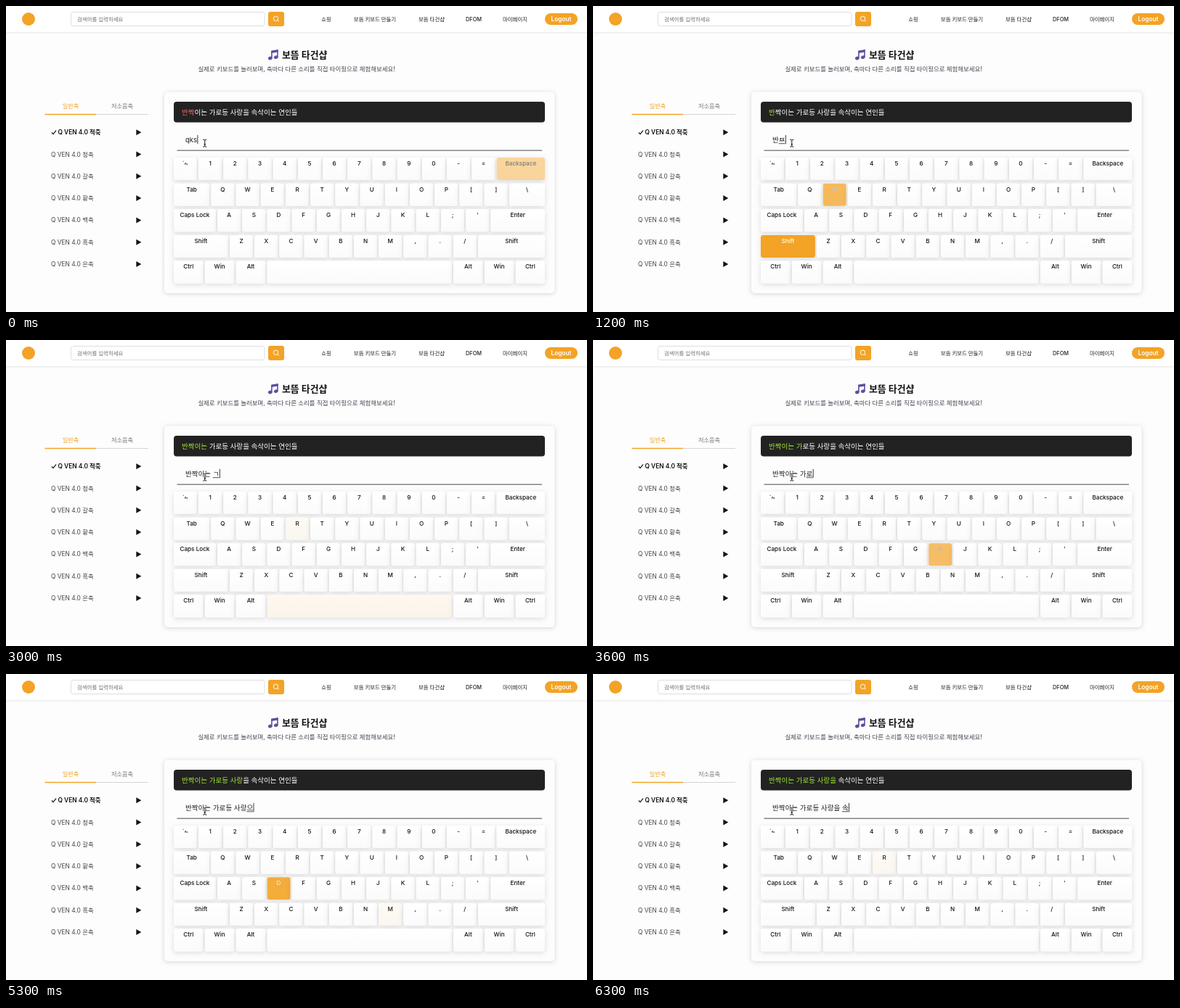
These frames come from a looping animation (800x422 px, 6.4 s). An HTML page with a canvas:

```html
<!DOCTYPE html>
<html lang="ko">
<head>
<meta charset="utf-8">
<title>키보드 타건샵</title>
<style>
  html, body { margin: 0; width: 100%; height: 100%; overflow: hidden; background: #fdfdfd; }
  canvas { display: block; width: 800px; height: 422px; }
</style>
</head>
<body>
<canvas id="stage"></canvas>
<script>
const W = 800, H = 422, LOOP = 6400, STEP = 100;
const ORANGE = '#f3a325';
const FONT = 'Inter, "Noto Sans CJK KR", "Noto Sans CJK JP", "Noto Sans CJK", sans-serif';
const SENTENCE = '반짝이는 가로등 사랑을 속삭이는 연인들';
const canvas = document.getElementById('stage');
const ctx = canvas.getContext('2d');
const dpr = window.devicePixelRatio || 1;
canvas.width = W * dpr;
canvas.height = H * dpr;
ctx.scale(dpr, dpr);

// Key presses: time, key, text afterwards, optional hold time
const presses = [
  [-45, 'Backspace', 'qks'], [130, 'Backspace', 'qk'], [290, 'Backspace', 'q'], [450, 'Backspace', ''],
  [600, 'Q', 'ㅂ'], [740, 'K', '바'], [880, 'S', '반'],
  [1000, 'Shift', '반', 250], [1125, 'W', '반ㅉ'], [1400, 'K', '반짜'], [1750, 'R', '반짝'],
  [2220, 'D', '반짝ㅇ'], [2335, 'L', '반짝이'],
  [2450, 'S', '반짝인'], [2560, 'M', '반짝이느'], [2680, 'S', '반짝이는'], [2788, ' ', '반짝이는 '],
  [2995, 'R', '반짝이는 ㄱ'], [3130, 'K', '반짝이는 가'],
  [3300, 'F', '반짝이는 갈'], [3450, 'H', '반짝이는 가로'],
  [3620, 'E', '반짝이는 가롣'], [3770, 'M', '반짝이는 가로드'], [3930, 'D', '반짝이는 가로등'],
  [4080, ' ', '반짝이는 가로등 '],
  [4250, 'T', '반짝이는 가로등 ㅅ'], [4420, 'K', '반짝이는 가로등 사'],
  [4600, 'F', '반짝이는 가로등 살'], [4770, 'K', '반짝이는 가로등 사라'], [4940, 'D', '반짝이는 가로등 사랑'],
  [5170, 'D', '반짝이는 가로등 사랑ㅇ'], [5295, 'M', '반짝이는 가로등 사랑으'],
  [5450, 'F', '반짝이는 가로등 사랑을'], [5690, ' ', '반짝이는 가로등 사랑을 '],
  [5900, 'T', '반짝이는 가로등 사랑을 ㅅ'], [6070, 'H', '반짝이는 가로등 사랑을 소'],
  [6295, 'R', '반짝이는 가로등 사랑을 속']
].map(([time, key, text, hold = 120]) => ({ time, key, text, hold }));

const keys = buildKeys();

function buildKeys() {
  const left = 231, right = 742, unit = 31.9, gap = 2.3;
  const rows = [
    [unit, ['`~', ...'1234567890-='], ['Backspace']],
    [49.2, ['Tab', ...'QWERTYUIOP[]'], ['\\']],
    [57.9, ['Caps Lock', ..."ASDFGHJKL;'"], ['Enter']],
    [74.8, ['Shift', ...'ZXCVBNM,./'], ['Shift']]
  ];
  const list = [];
  const add = (label, x, row, w) => {
    const id = list.some(k => k.id === label) ? label + ' right' : label;
    list.push({ id, label, x, y: 209 + row * 35.63, w });
  };
  rows.forEach(([first, labels, [last]], row) => {
    let x = left;
    labels.forEach((label, i) => {
      const w = i ? unit : first;
      add(label, x, row, w);
      x += w + gap;
    });
    add(last, x, row, right - x);
  });
  ['Ctrl', 'Win', 'Alt'].forEach((label, i) => add(label, left + i * 42.9, 4, 40.4));
  add(' ', 359.7, 4, 254.2);
  ['Alt', 'Win', 'Ctrl'].forEach((label, i) => add(label, 616.2 + i * 42.8, 4, 40.2));
  return list;
}

function glow(id, t) {
  const clamp = v => Math.max(0, Math.min(1, v));
  return presses.filter(p => p.key === id).reduce((best, p) => {
    const age = t - p.time;
    return Math.max(best, Math.min(clamp(age / 100), clamp(1 - (age - p.hold) / 100)));
  }, 0);
}

function font(size, weight = 400) {
  ctx.font = `${weight} ${size}px ${FONT}`;
}

// y is the visual middle of the line
function text(str, x, y, size, color = '#222', weight = 400, align = 'left') {
  font(size, weight);
  ctx.textAlign = align;
  ctx.fillStyle = color;
  ctx.fillText(str, x, y + size * 0.36);
}

function box(x, y, w, h, r, fill, stroke) {
  ctx.beginPath();
  ctx.roundRect(x, y, w, h, r);
  ctx.fillStyle = fill;
  ctx.fill();
  if (stroke) {
    ctx.strokeStyle = stroke;
    ctx.lineWidth = 1;
    ctx.stroke();
  }
}

function shadowBox(x, y, w, h, r, fill, alpha, blur, dy) {
  ctx.save();
  ctx.shadowColor = `rgba(0,0,0,${alpha})`;
  ctx.shadowBlur = blur * dpr;
  ctx.shadowOffsetY = dy * dpr;
  box(x, y, w, h, r, fill);
  ctx.restore();
}

function line(points, color, width) {
  ctx.beginPath();
  points.forEach(([x, y]) => ctx.lineTo(x, y));
  ctx.strokeStyle = color;
  ctx.lineWidth = width;
  ctx.stroke();
}

function disc(x, y, rx, ry, color, tilt = 0) {
  ctx.beginPath();
  ctx.ellipse(x, y, rx, ry, tilt, 0, Math.PI * 2);
  ctx.fillStyle = color;
  ctx.fill();
}

function drawHeader() {
  shadowBox(0, -4, W, 40, 0, '#fff', 0.12, 3, 0.5);
  disc(31, 18, 9, 9, ORANGE);
  box(89.5, 8.5, 266.5, 19, 3, '#fff', '#dedede');
  text('검색어를 입력하세요', 98, 18, 7.4, '#6f6f6f');
  box(361, 8, 22, 20, 3, ORANGE);
  ctx.beginPath();
  ctx.arc(371.5, 17.3, 3.2, 0, Math.PI * 2);
  ctx.strokeStyle = '#fff';
  ctx.lineWidth = 1;
  ctx.stroke();
  line([[373.8, 19.6], [375.8, 21.6]], '#fff', 1);
  [['쇼핑', 441], ['보뜸 키보드 만들기', 508], ['보뜸 타건샵', 586], ['DFOM', 644], ['마이페이지', 701]]
    .forEach(([label, x]) => text(label, x, 18, 7.4, '#222', 500, 'center'));
  box(742, 10, 45, 16, 8, ORANGE);
  text('Logout', 764.5, 18, 8.3, '#fff', 600, 'center');
}

function drawTitle() {
  const purple = '#5c519f';
  disc(363.8, 72, 2.9, 2.3, purple, -0.3);
  disc(371.8, 70.6, 2.9, 2.3, purple, -0.3);
  line([[365.9, 72], [365.9, 62.4], [373.9, 61], [373.9, 70.6]], purple, 1.6);
  line([[365.2, 63.6], [374.6, 62]], purple, 3);
  text('보뜸 타건샵', 380, 67, 12.9, '#111', 700);
  text('실제로 키보드를 눌러보며, 축마다 다른 소리를 직접 타이핑으로 체험해보세요!',
    400, 87, 8.42, '#424852', 400, 'center');
}

function drawSidebar() {
  text('일반축', 89, 138.5, 8.2, ORANGE, 500, 'center');
  text('저소음축', 160, 138.5, 8.2, '#777', 400, 'center');
  box(124, 149, 72, 1, 0, '#d4d4d4');
  box(53.5, 148.8, 70.5, 1.4, 0, ORANGE);
  [...'적청갈황백흑은'].forEach((kind, i) => {
    const y = 174.2 + i * 30.3, chosen = i === 0;
    if (chosen) line([[63, 174.5], [65, 176.7], [69, 171.7]], '#111', 1.2);
    text(`Q VEN 4.0 ${kind}축`, chosen ? 71.5 : 62, y, 8.4, chosen ? '#111' : '#444', chosen ? 600 : 400);
    ctx.beginPath();
    ctx.moveTo(179.3, y - 4);
    ctx.lineTo(186.3, y);
    ctx.lineTo(179.3, y + 4);
    ctx.fillStyle = '#151515';
    ctx.fill();
  });
}

function drawSentence(typed) {
  box(231, 132, 511, 28.5, 4, '#222');
  font(9.55, 500);
  let x = 242;
  const checked = typed.length - 1;
  [...SENTENCE].forEach((char, i) => {
    const color = i >= checked ? '#fff' : char === typed[i] ? '#a0e635' : '#f4695f';
    // The two-letter slip colours the same span of the sentence
    text(char, x, 146.2, 9.55, color, 500);
    x += ctx.measureText(char).width;
  });
}

function drawInput(typed) {
  text(typed, 247, 184.3, 9.55, '#222');
  const end = 247 + ctx.measureText(typed).width;
  if (/[ㄱ-힣]$/.test(typed)) {
    const start = 247 + ctx.measureText(typed.slice(0, -1)).width;
    box(start, 189.4, end - start, 0.8, 0, '#222');
  }
  box(end + 0.3, 178, 0.9, 12.3, 0, '#222');
  box(235.5, 198.4, 502.5, 1.5, 0, '#858585');
}

function drawKey(key, t) {
  const lit = glow(key.id, t), h = 31;
  shadowBox(key.x, key.y, key.w, h, 3, '#fff', 0.13, 7, 2);
  const shade = ctx.createLinearGradient(0, key.y, 0, key.y + h);
  shade.addColorStop(0, '#fff');
  shade.addColorStop(1, '#fbfbfb');
  box(key.x, key.y, key.w, h, 3, shade);
  if (lit) {
    ctx.globalAlpha = lit;
    box(key.x, key.y, key.w, h, 3, ORANGE);
    ctx.globalAlpha = 1;
  }
  const tone = Math.round(17 + 238 * lit);
  text(key.label, key.x + key.w / 2, key.y + 8, 8.15, `rgb(${tone},${tone},${tone})`, 500, 'center');
}

function drawPointer() {
  const shape = [
    [[271.3, 184.3], [273, 184.3], [273.8, 185.2], [274.6, 184.3], [276.3, 184.3]],
    [[273.8, 185.2], [273.8, 193.2]],
    [[271.3, 194.1], [273, 194.1], [273.8, 193.2], [274.6, 194.1], [276.3, 194.1]],
    [[272.5, 190.8], [275.1, 190.8]]
  ];
  shape.forEach(points => line(points, 'rgba(255,255,255,.8)', 2));
  shape.forEach(points => line(points, '#111', 1));
}

function draw(t) {
  const typed = presses.filter(p => p.time <= t).pop().text;
  ctx.fillStyle = '#fdfdfd';
  ctx.fillRect(0, 0, W, H);
  drawHeader();
  drawTitle();
  drawSidebar();
  shadowBox(218, 118.5, 537.5, 277.5, 5, '#fdfdfd', 0.16, 6, 1);
  drawSentence(typed);
  drawInput(typed);
  keys.forEach(key => drawKey(key, t));
  drawPointer();
}

let shown = -1;
const begin = performance.now();
function tick() {
  const elapsed = (performance.now() - begin) % LOOP;
  const t = Math.floor(elapsed / STEP) * STEP;
  if (t !== shown) draw(shown = t);
  requestAnimationFrame(tick);
}
tick();
</script>
</body>
</html>
```
